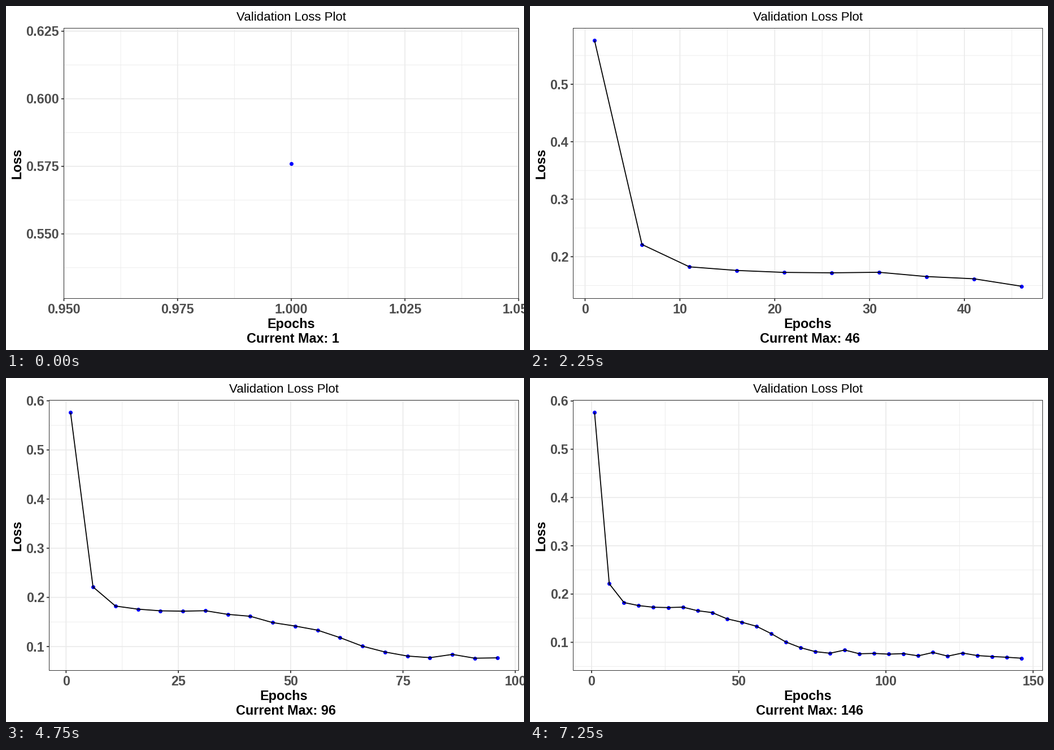
Write a matplotlib script that moves like this. It is 917 px wide and 611 px high and loops after 7.5 s.

```python
import math

import matplotlib.pyplot as plt
from matplotlib.animation import FuncAnimation

W, H, DPI = 917, 611, 64
PT = 72 / DPI  # points per pixel
TOP, BOTTOM, RIGHT = 39.5, 519.5, 907.5
GRID, DARK, LABEL = "#ebebeb", "#333333", "#4d4d4d"
FONT = "Liberation Sans"
HALF_SPACE = 3.2  # the caption is centred with a leading space

LOSS = [
    0.5761, 0.2213, 0.1824, 0.1761, 0.1727, 0.1720, 0.1729, 0.1655, 0.1616, 0.1487,
    0.1417, 0.1333, 0.1181, 0.1007, 0.0889, 0.0807, 0.0774, 0.0840, 0.0763, 0.0770,
    0.0755, 0.0766, 0.0720, 0.0790, 0.0714, 0.0778, 0.0726, 0.0706, 0.0691, 0.0671,
]
EPOCHS = [1 + 5 * i for i in range(len(LOSS))]

fig = plt.figure(figsize=(W / DPI, H / DPI), dpi=DPI, facecolor="white")
ax = fig.add_axes([0, 0, 1, 1])


def limits(values):
    lo, hi = min(values), max(values)
    pad = 0.05 * (hi - lo) if hi > lo else 0.05
    return lo - pad, hi + pad


def best_ticks(lo, hi, wanted=5):
    """Wilkinson's extended labelling: returns first tick, step and count."""
    span = hi - lo
    power = math.floor(math.log10(span))
    best, choice = -math.inf, None
    for rank, q in enumerate((1, 5, 2, 2.5, 4, 3)):
        for z in range(power - 2, power + 1):
            step = q * 10.0 ** z
            for count in range(2, 13):
                first = math.floor(hi / step) - count + 1
                for start in range(first, math.ceil(lo / step) + 1):
                    a, b = start * step, (start + count - 1) * step
                    simple = (a <= 0 <= b) - rank / 5
                    cover = 1 - 50 * ((hi - b) ** 2 + (lo - a) ** 2) / span ** 2
                    ratio = (max(b, hi) - min(a, lo)) / (wanted - 1) / step
                    dense = 2 - max(ratio, 1 / ratio)
                    score = 0.25 * simple + 0.2 * cover + 0.5 * dense
                    if score > best + 1e-9:
                        best, choice = score, (start, step, count)
    return choice


def breaks(lo, hi):
    start, step, count = best_ticks(lo, hi)
    eps = 1e-6 * (hi - lo)

    def inside(ticks):
        return [t for t in ticks if lo - eps <= t <= hi + eps]

    major = inside([(start + i) * step for i in range(count)])
    minor = inside([(start + i - 0.5) * step for i in range(count + 1)])
    return major, minor


def tick_labels(ticks):
    digits = 0
    while any(abs(round(t, digits) - t) > 1e-9 for t in ticks):
        digits += 1
    return [f"{t:.{digits}f}" for t in ticks]


def line(xs, ys, color, width, z):
    ax.plot(xs, ys, color=color, lw=width * PT, zorder=z, snap=False,
            solid_capstyle="butt", solid_joinstyle="miter")


def text(x, y, s, size=23.4, color="black", weight="bold", ha="center", angle=0):
    ax.text(x, y, s, fontsize=size * PT, color=color, weight=weight, family=FONT,
            ha=ha, va="baseline", rotation=angle, rotation_mode="anchor", zorder=6)


def draw(frame):
    ax.clear()
    ax.set_xlim(0, W)
    ax.set_ylim(H, 0)
    ax.axis("off")

    xs, ys = EPOCHS[:frame + 1], LOSS[:frame + 1]
    (x0, x1), (y0, y1) = limits(xs), limits(ys)
    x_major, x_minor = breaks(x0, x1)
    y_major, y_minor = breaks(y0, y1)
    y_text = tick_labels(y_major)
    decimals = len(y_text[0].split(".")[-1])
    left = 63.5 + 13 * decimals
    middle = (left + RIGHT) / 2

    def px(x):
        return left + (x - x0) / (x1 - x0) * (RIGHT - left)

    def py(y):
        return BOTTOM - (y - y0) / (y1 - y0) * (BOTTOM - TOP)

    for xt, yt, width, z in ((x_minor, y_minor, 0.9, 1), (x_major, y_major, 1.78, 2)):
        for x in xt:
            line([px(x)] * 2, [TOP, BOTTOM], GRID, width, z)
        for y in yt:
            line([left, RIGHT], [py(y)] * 2, GRID, width, z)

    points_x, points_y = [px(x) for x in xs], [py(y) for y in ys]
    ax.plot(points_x, points_y, "o", color="blue", ms=7 * PT, mew=0, zorder=3,
            snap=False)
    if frame:
        line(points_x, points_y, "black", 1.78, 4)

    line([left, RIGHT, RIGHT, left, left, RIGHT], [TOP, TOP, BOTTOM, BOTTOM, TOP, TOP],
         DARK, 1, 5)

    for x, s in zip(x_major, tick_labels(x_major)):
        line([px(x)] * 2, [BOTTOM, BOTTOM + 4.6], DARK, 1.78, 5)
        text(px(x), 546.3, s, color=LABEL)
    for y, s in zip(y_major, y_text):
        line([left - 4.6, left], [py(y)] * 2, DARK, 1.78, 5)
        text(left - 8.3, py(y) + 8.6, s, color=LABEL, ha="right")

    text(middle, 26, "Validation Loss Plot", size=22.3, weight="normal")
    text(middle, 572.4, "Epochs")
    text(middle + HALF_SPACE, 598, f"Current Max: {xs[-1]}")
    text(26.4, (TOP + BOTTOM) / 2, "Loss", angle=90)
    return []


anim = FuncAnimation(fig, draw, frames=len(LOSS), interval=250, repeat=True,
                     repeat_delay=0, blit=False)
plt.show()
```
